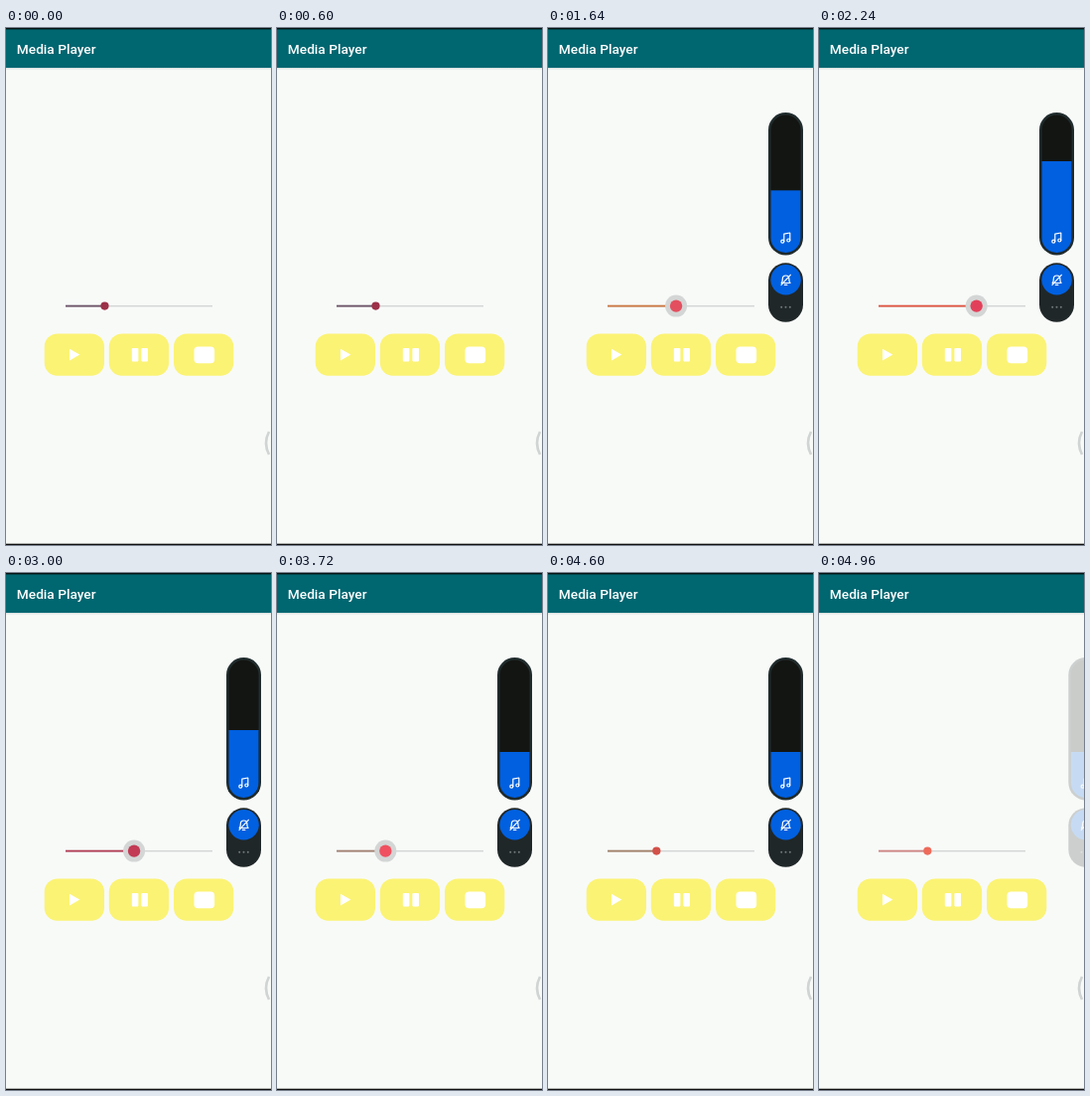
These frames come from a looping animation (267x520 px, 5000 ms). An HTML page:

```html
<!DOCTYPE html>
<html lang="en">
<head>
<meta charset="utf-8">
<title>Media Player</title>
<style>
  html, body { margin: 0; width: 100%; height: 100%; overflow: hidden; background: #f8faf8; }
  svg { display: block; width: 267px; height: 520px; }
  .title { font: 500 13.7px Roboto, sans-serif; fill: #fff; }
  .icon { fill: none; stroke: #fff; stroke-width: 1.2; stroke-linecap: round; stroke-linejoin: round; }
</style>
</head>
<body>
<svg viewBox="0 0 267 520">
  <defs>
    <linearGradient id="shade" x2="0" y2="1">
      <stop stop-color="#cfd8d8"/><stop offset="1" stop-color="#f8faf8"/>
    </linearGradient>
    <clipPath id="slot"><rect x="224.5" y="87.5" width="30" height="138.5" rx="15"/></clipPath>
  </defs>

  <rect width="267" height="520" fill="#f8faf8"/>
  <rect y="40" width="267" height="2" fill="url(#shade)"/>
  <rect width="267" height="40" fill="#006670"/>
  <rect width="267" height="1.4" fill="#061414"/>
  <rect y="518.7" width="267" height="1.3" fill="#111"/>
  <text class="title" x="10.8" y="26">Media Player</text>

  <g fill="#fbf374">
    <rect x="38.7" y="307.5" width="60.3" height="42.3" rx="13"/>
    <rect x="103.8" y="307.5" width="60.3" height="42.3" rx="13"/>
    <rect x="169" y="307.5" width="60.3" height="42.3" rx="13"/>
  </g>
  <g fill="#fff">
    <path d="M64 322.7 74.3 328.6 64 334.6Z"/>
    <rect x="126.8" y="322" width="6.6" height="13.4" rx=".8"/>
    <rect x="136.4" y="322" width="6.6" height="13.4" rx=".8"/>
    <rect x="189.5" y="320.4" width="20.6" height="16.8" rx="4"/>
  </g>

  <rect x="60" y="278.9" width="148" height="1.5" fill="#d3d6d5"/>
  <rect id="bar" x="60" y="278.7" height="1.8"/>
  <circle id="halo" cy="279.6" fill="#d3d6d5"/>
  <circle id="thumb" cy="279.6"/>

  <path d="M265 406Q259 417.500 265 429" fill="none" stroke="#d0d4d3" stroke-width="2.6"/>

  <g id="panel">
    <rect x="222" y="85" width="35" height="143.500" rx="17.500" fill="#202b2c"/>
    <g clip-path="url(#slot)">
      <rect x="224" y="87" width="31" height="140" fill="#131512"/>
      <rect id="level" x="224" width="31" height="140" fill="#0060e0"/>
    </g>
    <g class="icon">
      <path d="M237.800 214.500V207.200L243.800 206V213.300"/>
      <circle cx="236.300" cy="214.700" r="1.500"/>
      <circle cx="242.300" cy="213.500" r="1.500"/>
    </g>
    <rect x="222" y="236.300" width="35" height="59.500" rx="17.500" fill="#202728"/>
    <circle cx="239.600" cy="253.200" r="15.200" fill="#0060e0"/>
    <g class="icon">
      <path d="M235.200 256.500Q236.300 255.200 236.300 252.500Q236.300 249 239.600 249Q242.900 249 242.900 252.500Q242.900 255.200 244 256.500ZM238.300 258.300H240.900M235 258.300 244.300 248.300"/>
    </g>
    <g fill="#747b7b">
      <circle cx="235.200" cy="280.800" r="1"/>
      <circle cx="239.500" cy="280.800" r="1"/>
      <circle cx="243.800" cy="280.800" r="1"/>
    </g>
  </g>
</svg>
<script>
const LOOP = 5000, STEPS = 15, LEFT = 60, WIDTH = 148;
const PRESS = 1040, RELEASE = 4100, SHOW = 1200, HIDE = 4760;

// time, volume step
const volume = [[0, 4], [1080, 5], [1380, 6], [1560, 7], [1740, 8], [1920, 9], [2100, 10],
  [2480, 9], [2720, 8], [2940, 7], [3220, 6], [3480, 5]];

// time, bar colour, thumb colour
const tints = [[0, '#6c5268', '#9c3048'], [1040, '#cb7640', '#e34f5f'], [1800, '#df513f', '#e2405a'],
  [2640, '#b23a54', '#c23a54'], [3400, '#a27f70', '#ef5161'], [4200, '#a07f68', '#d25149'],
  [4800, '#d08383', '#ee6b5a']];

const [bar, halo, thumb, level, panel] =
  ['bar', 'halo', 'thumb', 'level', 'panel'].map(id => document.getElementById(id));

const ramp = (t, from, span) => Math.min(1, Math.max(0, (t - from) / span));
const easeOut = p => 1 - (1 - p) ** 3;
const indexAt = (table, t) => table.findLastIndex(row => row[0] <= t);

function set(el, attrs) {
  for (const key in attrs) el.setAttribute(key, attrs[key]);
}

function draw(t) {
  const i = indexAt(volume, t);
  const [since, step] = volume[i];
  const before = i ? volume[i - 1][1] : step;
  const shown = before + (step - before) * ramp(t, since, 100);
  const x = LEFT + WIDTH * step / STEPS;
  const press = ramp(t, PRESS, 100) - ramp(t, RELEASE, 150);
  const [, barColor, thumbColor] = tints[indexAt(tints, t)];

  set(bar, { width: x - LEFT, fill: barColor });
  set(halo, { cx: x, r: 4 + 7 * press, opacity: Math.min(1, press * 2) });
  set(thumb, { cx: x, r: 4.1 + 2.1 * press, fill: thumbColor });
  set(level, { y: 226 - 138 * shown / STEPS });

  const enter = easeOut(ramp(t, SHOW, 300));
  const leave = ramp(t, HIDE, 240);
  set(panel, {
    transform: `translate(${45 * (1 - enter) + 35 * leave} 0)`,
    opacity: enter * (1 - 0.96 * leave)
  });
}

const start = performance.now();
function tick() {
  draw((performance.now() - start) % LOOP);
  requestAnimationFrame(tick);
}
tick();
</script>
</body>
</html>
```
